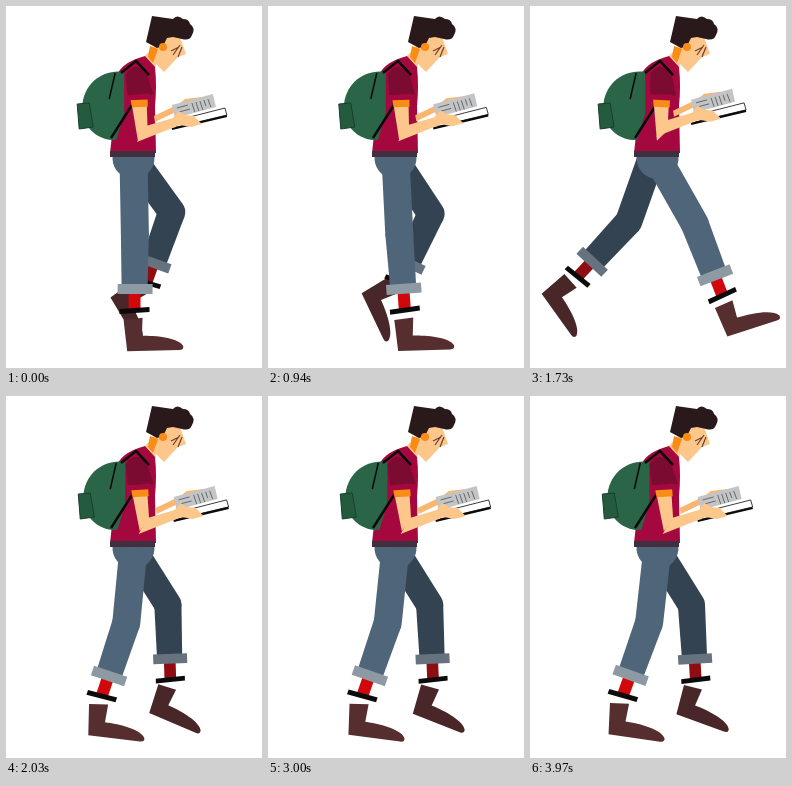
An HTML page without scripts that plays this animation: 256x362 px, repeating every 4 s.

```html
<!DOCTYPE html>
<html lang="en">
<head>
<meta charset="utf-8">
<title>Walking reader</title>
<style>
/* --p is the walk phase: one stride per turn, starting over every four seconds */
@property --p { syntax: "<angle>"; inherits: true; initial-value: 0deg; }
@keyframes walk { from { --p: 0deg; } to { --p: 1490deg; } }

html, body { margin: 0; width: 100%; height: 100%; overflow: hidden; background: #fff; }
svg { display: block; width: 100%; height: 100%; animation: walk 4s linear infinite; }

/* joint angles from the vertical, as sums of a few waves */
.leg {
  --thigh: calc(11.3deg + 26.6deg * cos(var(--q) - 239deg) + 7.2deg * cos(2 * var(--q)) + 6deg * cos(3 * var(--q) - 128deg));
  --shin: calc(-10deg + 32deg * cos(var(--q) + 72deg) + 1.8deg * sin(2 * var(--q)));
  --foot: calc(21deg + 40.7deg * cos(var(--q) - 135deg) + 11.9deg * cos(2 * var(--q) + 47deg) + 3.2deg * cos(3 * var(--q) + 118deg));
}
.near { --q: var(--p); --cuff: #8d9aa4; --sock: #d0080c; --boot: #562e2f; fill: #4f6579; }
.far { --q: calc(var(--p) + 180deg); --cuff: #66737f; --sock: #8f0c12; --boot: #492728; fill: #334351; }
.hip { transform: rotate(calc(-1 * var(--thigh))); }
.knee { transform: translate(0, 75px) rotate(calc(var(--thigh) - var(--shin))); }
.ankle { transform: translate(0, 81px) rotate(calc(var(--shin) + var(--foot))); }
.cuff { fill: var(--cuff); }
.sock { fill: var(--sock); }
.boot { fill: var(--boot); }

/* upper body sways once per stride */
.body { --sway: cos(var(--p) - 62deg); }
.packs { transform: translate(calc(2.5px * var(--sway)), 0); }
.reading { transform: translate(calc(4px * var(--sway)), calc(4.3px * var(--sway))); }
.arm { transform: rotate(calc(-4deg * var(--sway))); transform-origin: 131px 75px; }

.ink { fill: #0c0a0b; }
.line { fill: none; stroke: #0c0a0b; }
.strap { stroke-width: 2.5; }
.skin { fill: #fdc68a; }
.shade { fill: #f9b671; }
.orange { fill: #f98b17; }
.shirt { fill: #a5083f; }
.sleeve { fill: #7c0b31; }
.hair { fill: #2a191b; }
.pack { fill: #2b6547; }
</style>
</head>
<body>
<svg viewBox="0 0 256 362">
  <defs>
    <path id="boot" class="boot" d="M-11 6L8 4L7 22C22 22 44 25 48 33Q49 37 44 37H-8Z"/>
    <path id="thigh" d="M-14 0H14V75A14 14 0 0 1 -14 75Z"/>
    <g id="shin">
      <path class="sock" d="M-6 58H6V77H-6Z"/>
      <path class="ink" d="M-15 76L15 74V79L-15 81Z"/>
      <path d="M-14 0H14L13 54H-13Z"/>
      <path class="cuff" d="M-17 51H18V61H-17Z"/>
    </g>
  </defs>

  <g transform="translate(123 147) scale(.97)">
    <g class="leg far"><g class="hip">
      <use href="#thigh"/>
      <g class="knee">
        <g class="ankle"><use href="#boot"/></g>
        <use href="#shin"/>
      </g>
    </g></g>
  </g>

  <g transform="translate(127.5 152)">
    <g class="leg near"><g class="hip">
      <circle r="21"/>
      <use href="#thigh"/>
      <g class="knee">
        <g class="ankle"><use href="#boot"/></g>
        <use href="#shin"/>
      </g>
    </g></g>
  </g>

  <g class="body">
    <!-- head -->
    <path class="skin" d="M139 50L150 38L163 30L174 31L180 48L172 51L158 66L150 58L149 63Z"/>
    <path class="orange" d="M144 40L152 43L147 57L142 51Z"/>
    <path class="hair" d="M146 10L167 13Q171 8 177 13Q183 13 184 18Q190 22 186 29Q184 35 176 33L167 31L161 32L157 40L151 42L140 36Z"/>
    <circle class="orange" cx="157" cy="41" r="4"/>
    <path d="M174 39L167 49M176 41L172 51M165 45L173 41" fill="none" stroke="#6b4030" stroke-width="1.2"/>

    <!-- torso -->
    <path class="shirt" d="M139 50L149 61Q151 80 149 100L150 147H104L107 120L109 75Q112 57 139 50Z"/>
    <path d="M104 145H149V151H104Z" fill="#40303f"/>

    <g class="packs">
      <path class="pack" d="M117 66C95 63 76 78 75 101C75 121 90 135 109 134L117 108Z"/>
      <path d="M70 98L82 97L86 121L72 123Z" fill="#245b3f" stroke="#183f2b"/>
      <path class="line" d="M108 67L102 93" stroke-width="1.5"/>
    </g>
    <path class="line strap" d="M115 67L130 55L143 69M105 132L126 99"/>

    <!-- forearms and book -->
    <g class="reading">
      <path class="shade" d="M146 108L171 96L177 91L194 89L186 97L172 102L147 114Z"/>
      <path d="M166 113L217 100L219 107L169 119Z" fill="#fff" stroke="#0c0a0b" stroke-width=".8"/>
      <path class="line" d="M164 121L219 108" stroke-width="2.2"/>
      <path d="M164 97L205 86L208 99L167 110Z" fill="#c2c4c6"/>
      <path d="M169 100L180 97M171 104L182 101M184 95L187 104M188 94L191 103M192 93L195 102M196 92L198 98M200 91L203 99" fill="none" stroke="#66686b"/>
      <path class="skin" d="M129 134L138 118L165 110L171 103L177 107L186 108L194 116L183 119L172 117Z"/>
    </g>

    <!-- upper arm -->
    <g class="arm">
      <path class="skin" d="M125 98H140L140 124L130 135Z"/>
      <path class="orange" d="M124 93H141V101H125Z"/>
      <path class="sleeve" d="M120 68Q129 54 141 67L147 89H121Z"/>
      <path class="shirt" d="M120 89L143 88L142 94H121Z"/>
    </g>
    <path class="line strap" d="M130 55L143 69"/>
  </g>
</svg>
</body>
</html>
```
